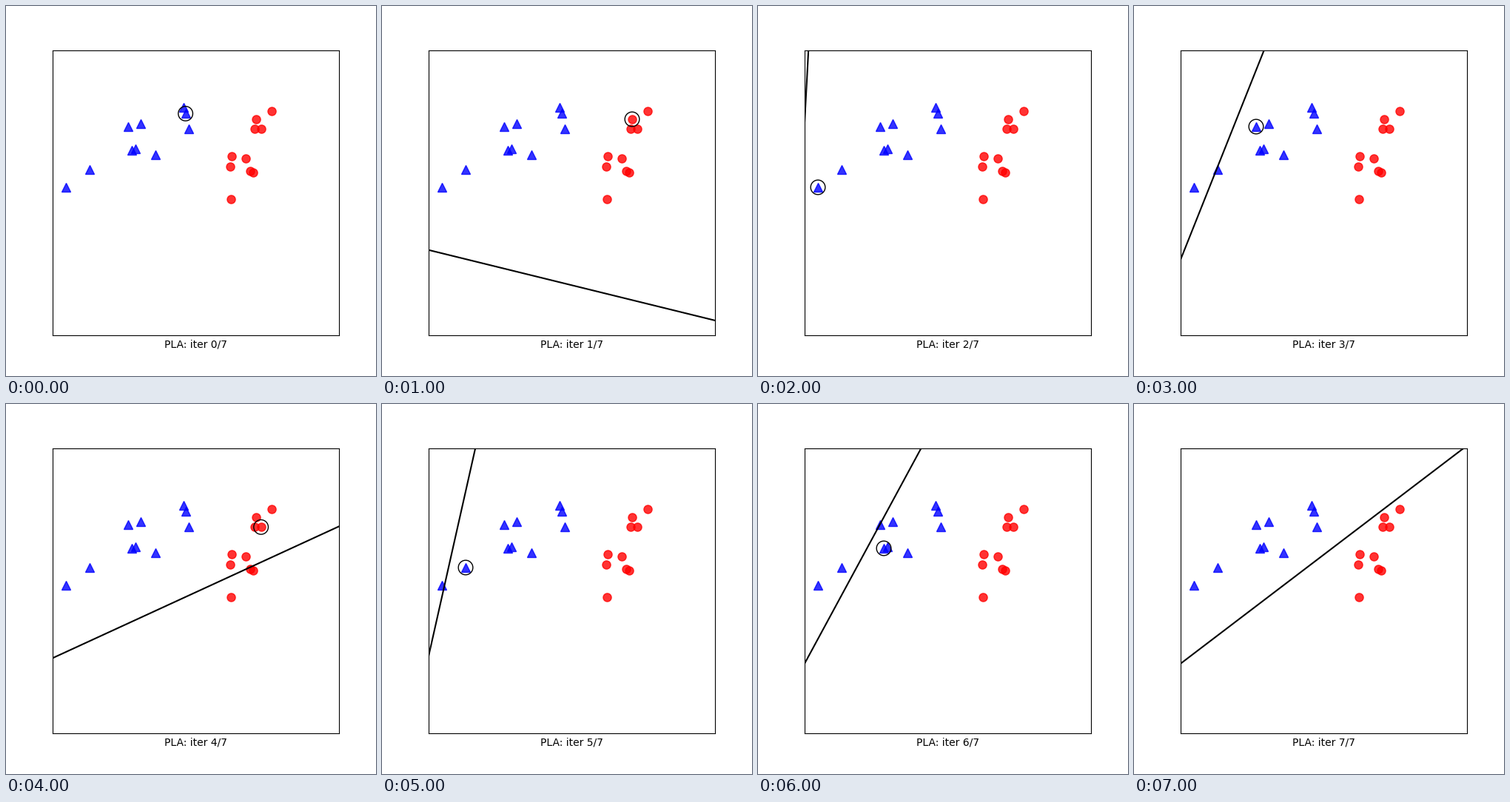
These frames come from a looping animation (500x500 px, 10 s). A matplotlib script:

```python
import numpy as np
import matplotlib.pyplot as plt
from matplotlib.animation import FuncAnimation

FRAMES = 10
X_LIM, Y_LIM = (0, 6), (-2, 4)

# Samples in stage pixels, in the order the perceptron visits them
samples = [(242.6, 145.4), (338, 153), (81, 245), (165, 163), (344.6, 166.3),
           (113, 221), (170, 195), (240, 137), (182, 159), (247, 166),
           (175, 193), (202, 201), (336, 166), (359, 142), (305, 203),
           (303, 217), (324, 206), (330, 223), (334, 225), (304, 261)]
px, py = np.array(samples).T
x = (px - 62.5) * 6 / 387.5
y = (445 - py) * 6 / 385 - 2
signs = np.where(x < 3.3, 1, -1)


def learn(weights):
    """Sweep the samples once, correcting the weights at every mistake."""
    history, mistakes = [weights], []
    for vector, sign in zip(np.column_stack([np.ones_like(x), x, y]), signs):
        if sign * (weights @ vector) <= 0:
            weights = weights + sign * vector
            history.append(weights)
            mistakes.append(vector[1:])
    return history, mistakes


history, mistakes = learn(np.array([-0.447, -2.11, 0.072]))
steps = len(mistakes)

fig, ax = plt.subplots(figsize=(5, 5), dpi=100)
ax.set(xlim=X_LIM, ylim=Y_LIM, xticks=[], yticks=[])
for sign, marker, color in [(-1, "o", "red"), (1, "^", "blue")]:
    group = signs == sign
    ax.plot(x[group], y[group], marker, color=color, ms=8, alpha=0.8)
border, = ax.plot([], [], color="black", lw=1.5)
ring = ax.scatter([0], [0], s=200, facecolors="none", edgecolors="black",
                  linewidths=1, zorder=3)
label = ax.set_xlabel("")


def draw(frame):
    step = min(frame, steps)
    bias, a, c = history[step]
    ends = np.array(X_LIM)
    border.set_data(ends, -(bias + a * ends) / c)
    border.set_visible(step > 0)
    ring.set_visible(step < steps)
    if step < steps:
        ring.set_offsets([mistakes[step]])
    label.set_text(f"PLA: iter {step}/{steps}")
    return border, ring, label


anim = FuncAnimation(fig, draw, frames=FRAMES, interval=1000,
                     repeat=True, repeat_delay=0)
plt.show()
```
